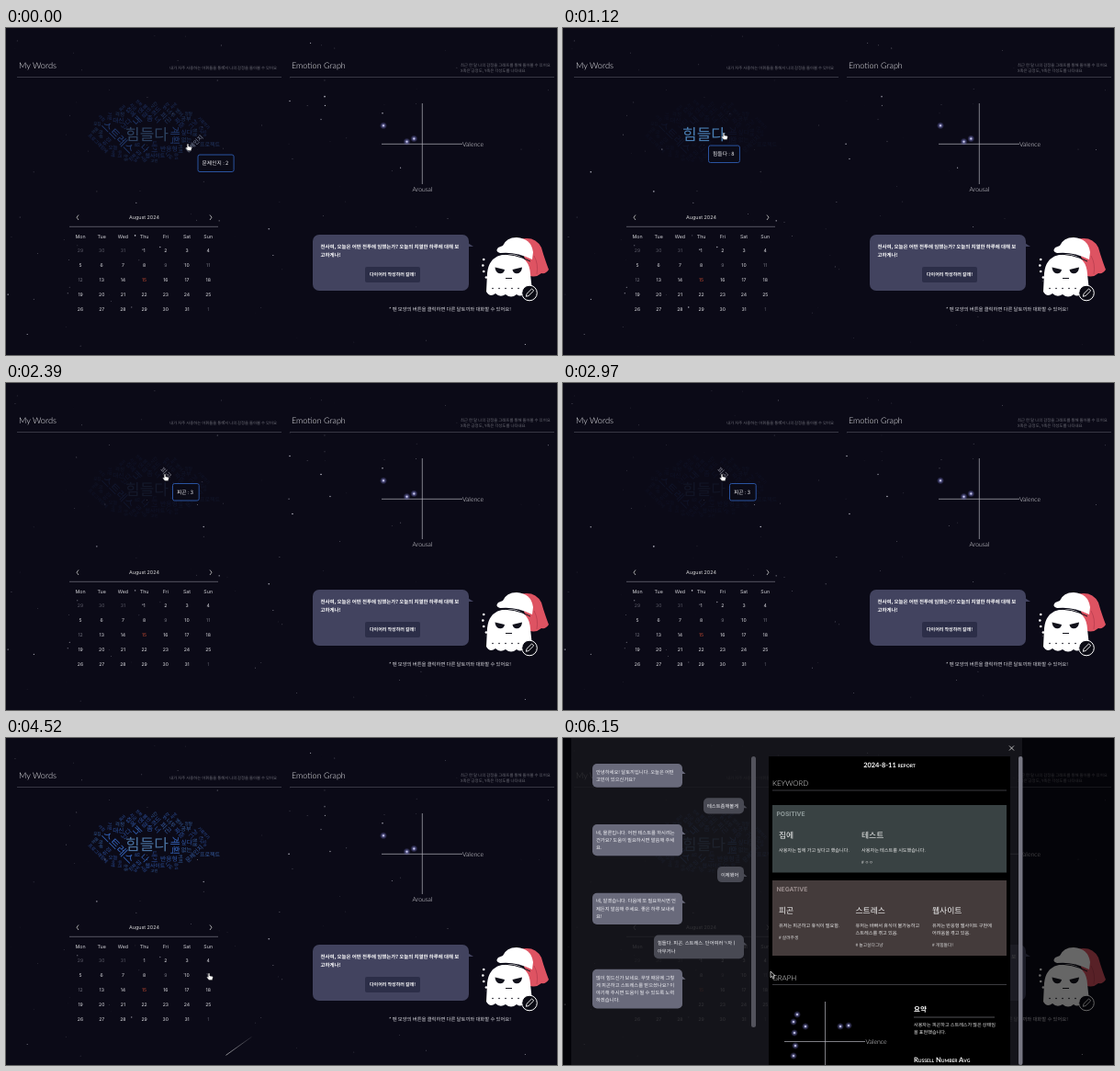
An HTML page for the animation above (6.18 s loop, 600x356 px).

```html
<!DOCTYPE html>
<html>
<head>
<meta charset="utf-8">
<title>Emotion diary</title>
<style>
  html, body { margin: 0; width: 100%; height: 100%; overflow: hidden; background: #0b0a17; }
  svg { display: block; width: 100%; height: 100%; }
  text { font-family: Inter, "Noto Sans CJK KR", "Noto Sans CJK", sans-serif; white-space: pre; text-rendering: geometricPrecision; }
  .ko { font-family: "Noto Sans CJK KR", "Noto Sans CJK", sans-serif; }
  .thin { font-family: Lato, sans-serif; font-weight: 300; }
  .caps { font-family: Lato, sans-serif; font-weight: 700; font-variant: small-caps; }
  .medium { font-weight: 500; }
  .bold { font-weight: 700; }
</style>
</head>
<body>
<svg id="stage" viewBox="0 0 600 356"></svg>
<script>
const LOOP = 6180;
const OPEN_MODAL = 5620;
const stage = document.getElementById("stage");

const text = (x, y, size, str, fill = "#fff", cls = "ko", anchor = "start") =>
  `<text x="${x}" y="${y}" font-size="${size}" fill="${fill}" class="${cls}" text-anchor="${anchor}">${str}</text>`;
const lines = (x, y, size, rows, fill, cls, pitch = 8) =>
  rows.map((row, i) => text(x, y + i * pitch, size, row, fill, cls)).join("");
const rect = (x, y, w, h, fill, r = 0, opacity = 1) =>
  `<rect x="${x}" y="${y}" width="${w}" height="${h}" rx="${r}" fill="${fill}" opacity="${opacity}"/>`;
const path = (d, stroke = "#fff", width = 0.7) =>
  `<path d="${d}" stroke="${stroke}" stroke-width="${width}" fill="none"/>`;
const glow = ([x, y]) =>
  `<circle cx="${x}" cy="${y}" r="4" fill="url(#glow)"/><circle cx="${x}" cy="${y}" r="1" fill="#d0d0ee"/>`;

let seed = 29;
const random = () => (seed = (seed * 16807) % 2147483647) / 2147483647;
const pick = list => list[Math.floor(random() * list.length)];

const stars = Array.from({ length: 110 }, () => ({
  x: 2 + random() * 590,
  y: 5 + random() * 350,
  r: 0.3 + 0.55 * random() ** 3,
  phase: random() * Math.PI * 2,
  cycles: 1 + Math.floor(random() * 3)
}));
const sky = stars.map(s =>
  `<circle class="star" cx="${s.x}" cy="${s.y}" r="${s.r}" fill="#e6e6f2"/>`).join("");

// Word cloud: main words are placed, the rest spiral outwards to the first free spot
const cloud = [
  { word: "힘들다", x: 153.5, y: 116, size: 17, angle: 0, fill: "#4a72a0" },
  { word: "스트레스", x: 122, y: 119, size: 12, angle: 45, fill: "#3361b5" },
  { word: "계획", x: 184, y: 117, size: 11, angle: 90, fill: "#3361b5" },
  { word: "내", x: 143, y: 101, size: 10, angle: -45, fill: "#3361b5" },
  { word: "나", x: 151, y: 131, size: 9, angle: 45, fill: "#3361b5" },
  { word: "피곤", x: 174, y: 98, size: 7.5, angle: 45, fill: "#34599c" },
  { word: "문제인지", x: 205, y: 126, size: 6.5, angle: -45, fill: "#34599c" },
  { word: "프로젝트", x: 222, y: 127, size: 6, angle: 0, fill: "#34599c" }
];
const smallWords = ("좀 난다 너 내가 짜증 반응형 싶다 연결 대신 코드 집에 없는 그냥 너무 공부 집 웹사이트 취업 일 " +
  "걱정 오늘 불안 커피 영어 하루 잠을 기분 프로그래밍에 나도 진짜 우리 생각 지금 정말 시간 친구 모집 기록하기 " +
  "사람 마음 아침 운동 회사 저녁 여행 날씨 음식 전화 약속 고민").split(" ");

const discs = w => [...w.word].map((_, i) => {
  const along = (i - (w.word.length - 1) / 2) * w.size * 0.92;
  const turn = w.angle * Math.PI / 180;
  return { x: w.x + along * Math.cos(turn), y: w.y + along * Math.sin(turn), r: w.size * 0.52 };
});
const occupied = cloud.flatMap(discs);
const isFree = list => list.every(a => occupied.every(b => Math.hypot(a.x - b.x, a.y - b.y) > a.r + b.r));

smallWords.forEach((word, i) => {
  const entry = {
    word,
    size: 4.1 + 3.2 * (1 - i / smallWords.length) ** 1.6,
    angle: pick([-45, 0, 45, 90]),
    fill: pick(["#2e56a4", "#294a92", "#355f9f"])
  };
  const offset = random() * 6;
  for (let reach = 14; reach < 40; reach += 0.03) {
    const turn = reach * 9 + offset;
    entry.x = 156 + reach * 1.95 * Math.cos(turn);
    entry.y = 113 + reach * Math.sin(turn);
    if (isFree(discs(entry))) {
      occupied.push(...discs(entry));
      cloud.push(entry);
      break;
    }
  }
});
const cloudMarkup = cloud.map(w =>
  `<text class="ko word" font-size="${w.size}" text-anchor="middle" transform="translate(${w.x} ${w.y}) rotate(${w.angle})" y="${w.size * 0.36}">${w.word}</text>`).join("");

function dayColor(index) {
  if (index === 17) return "#c24a32";
  if (index < 3 || index === 34) return "#5c5c68";
  return [11, 13, 14].includes(index) ? "#777782" : "#e4e4e8";
}
function calendar() {
  const column = i => 81 + i * 23.2;
  let out = text(150.5, 207.8, 5.4, "August 2024", "#ddd", "", "middle");
  out += path("M79 203.5L77 206.2L79 209M222 203.5L224 206.2L222 209", "#ccc", 0.8);
  out += path("M69 216.3H231", "#777785");
  ["Mon", "Tue", "Wed", "Thu", "Fri", "Sat", "Sun"].forEach((day, i) => {
    out += text(column(i), 228.9, 5.3, day, "#d5d5da", "", "middle");
  });
  for (let i = 0; i < 35; i++) {
    const day = (i + 28) % 31 + 1;
    out += text(column(i % 7), 244 + Math.floor(i / 7) * 16.1, 5.1, day, dayColor(i), "", "middle");
  }
  return out;
}

const mascot = `
  <path d="M560 230Q576 226 583 239Q586 250 591 263Q588 268 583 267Q576 273 569 269L564 248Z" fill="#de5362"/>
  <path d="M575 248Q580 257 578 268" fill="none" stroke="#b23c4c" stroke-width=".7"/>
  <path d="M523 287L524 267Q526 246 548 246Q570 247 571 268L573 286Q570 292 565 288Q561 294 556 290Q550 295 544 290Q538 294 533 289Q527 294 523 287Z" fill="#fff"/>
  <path d="M536 246.5Q554 245 571 254" fill="none" stroke="#11111b" stroke-width="1"/>
  <path d="M541 237Q545 228 556 228Q572 229 574 244L573 252Q555 243 538 245Q532 243 536 239Z" fill="#fff"/>
  <path d="M532.5 260.5L543 263Q542 267.5 538 267.3Q533 267 532.5 260.5ZM562 260.5L551.5 263Q552.5 267.5 556.5 267.3Q561.5 267 562 260.5Z" fill="#11111b"/>
  <path d="M544 272.5H551" stroke="#11111b" stroke-width="1"/>
  ${Array.from({ length: 5 }, (_, i) =>
    `<circle cx="${519.3 + (i - 3) ** 2 * 0.9}" cy="${272 - i * 6.5 + 6}" r="1.3" fill="#fff"/>
     <circle cx="${530 + i * 7}" cy="283.5" r=".8" fill="#11111b"/>`).join("")}
  <circle cx="570" cy="288.5" r="8.3" fill="#0b0b14" stroke="#fff" stroke-width="1"/>
  <path d="M566.3 292.3L567 289.4L572.6 283.9L574.7 286L569.1 291.5Z" fill="none" stroke="#fff" stroke-width=".9"/>`;

const dashboard =
  text(14, 43.5, 9.2, "My Words", "#f0f0f4", "thin") +
  text(311, 43.5, 9, "Emotion Graph", "#f0f0f4", "thin") +
  text(295, 45, 4.35, "내가 자주 사용하는 어휘들을 통해서 나의 감정을 돌아볼 수 있어요", "#6c6c76", "ko", "end") +
  lines(495, 41.6, 4.4, ["최근 한 달 나의 감정을 그래프를 통해 돌아볼 수 있어요", "X축은 긍정도, Y축은 각성도를 나타내요"], "#6c6c76", "ko", 6.3) +
  path("M12 53.5H300M309 53.5H597", "#4b4b58") +
  calendar() +
  path("M453.3 82V170M409 126.3H497", "#b5b5bd") +
  text(497, 129, 6.9, "Valence", "#f0f0f4", "thin") +
  text(453.5, 177.5, 6.8, "Arousal", "#f0f0f4", "thin", "middle") +
  [[411, 106.3], [436.5, 123.7], [444.3, 120.5]].map(glow).join("") +
  rect(334, 225, 170, 61, "#42435f", 7) +
  `<path d="M500 232L509 238H503Z" fill="#42435f"/>` +
  lines(342.5, 240.3, 5.45, ["전사여, 오늘은 어떤 전투에 임했는가? 오늘의 치열한 하루에 대해 보", "고하게나!"], "#fff", "ko bold", 8.2) +
  rect(391, 260, 60, 17, "#2c2e48", 2) +
  text(421, 270.2, 5, "다이어리 작성하러 갈래!", "#fff", "ko bold", "middle") +
  mascot +
  text(417, 307.6, 5.35, "* 펜 모양의 버튼을 클릭하면 다른 달토끼와 대화할 수 있어요!", "#dcdce2");

// Report modal
const messages = [
  { rows: ["안녕하세요! 달토끼입니다. 오늘은 어떤", "고민이 있으신가요?"] },
  { rows: ["테스트좀해볼게"], mine: true },
  { rows: ["네, 물론입니다. 어떤 테스트를 하시려는", "건가요? 도움이 필요하시면 말씀해 주세", "요."] },
  { rows: ["이제됐어"], mine: true },
  { rows: ["네, 알겠습니다. 다음에 또 필요하시면 언", "제든지 말씀해 주세요. 좋은 하루 보내세", "요!"] },
  { rows: ["힘들다. 피곤. 스트레스. 단어여러ㄱ자ㅣ", "아무거나"], mine: true },
  { rows: ["많이 힘드신가 보네요. 무엇 때문에 그렇", "게 피곤하고 스트레스를 받으셨나요? 이", "야기해 주시면 도움이 될 수 있도록 노력", "하겠습니다."] }
];
function chat() {
  let y = 28;
  return messages.map(({ rows, mine }) => {
    const width = Math.min(98, 9 + rows[0].length * 5);
    const height = 8.7 + rows.length * 8.5;
    const right = mine ? 197 : 130;
    const fill = mine ? "#484953" : "#696a7b";
    const bubble = rect(right - width, y, width, height, fill, 5) +
      `<path d="M${right - 2} ${y + 6}l5.5 5h-5.5Z" fill="${fill}"/>` +
      lines(right - width + 4, y + 10.7, 5.3, rows, "#f4f4f8", "ko", 8.3);
    y += height + 11.6;
    return bubble;
  }).join("");
}

function keywordBox(y, height, title, fill, color, pitch, keywords) {
  return rect(228, y, 255, height, fill) +
    text(232.5, y + 12.3, 6.7, title, color, "bold") +
    keywords.map(({ word, rows, tag }, i) => {
      const x = 235 + i * pitch;
      return text(x, y + 35.8, 8.8, word, "#f4f4f4", "ko medium") +
        lines(x, y + 51.3, 5.15, rows, "#ececec", "ko") +
        (tag ? text(x, y + 56 + rows.length * 8, 4.8, tag, "#d8d8d8") : "");
    }).join("");
}

const modal =
  rect(0, 0, 600, 356, "#000", 0, 0.6) +
  rect(9, 0, 491, 356, "#1d1d23", 0, 0.66) +
  path("M486 8.5L491 13.5M491 8.5L486 13.5", "#ddd", 0.8) +
  rect(205, 20, 5, 295, "#53535c", 2.5) +
  rect(496, 20, 4.5, 336, "#777783", 2) +
  chat() +
  rect(224, 20, 263, 336, "#000") +
  text(355.5, 32.3, 7.4, "2024-8-11 report", "#fff", "caps", "middle") +
  text(228, 52, 7.9, "KEYWORD", "#f0f0f0", "thin") +
  path("M228 57H483M228 268.5H483", "#55555c") +
  keywordBox(73, 73.5, "POSITIVE", "#394243", "#8e9999", 90, [
    { word: "집에", rows: ["사용자는 집에 가고 싶다고 했습니다."] },
    { word: "테스트", rows: ["사용자는 테스트를 시도했습니다."], tag: "# ㅇㅇ" }
  ]) +
  keywordBox(155, 82, "NEGATIVE", "#443b3b", "#9b8e8e", 83.5, [
    { word: "피곤", rows: ["유저는 피곤하고 휴식이 필요함."], tag: "# 살려주셍" },
    { word: "스트레스", rows: ["유저는 바빠서 휴식이 불가능하고", "스트레스를 겪고 있음."], tag: "# 놀고싶다그냥" },
    { word: "웹사이트", rows: ["유저는 반응형 웹사이트 구현에", "어려움을 겪고 있음."], tag: "# 개힘들다!" }
  ]) +
  text(228, 263.7, 7.9, "GRAPH", "#f0f0f0", "thin") +
  path("M285.5 287V356M241 330.5H329", "#b5b5bd") +
  text(329.5, 333, 6.9, "Valence", "#f0f0f4", "thin") +
  [[255, 301], [251, 309], [264, 314], [302, 314], [311, 313], [252, 321], [253, 335], [251, 346]].map(glow).join("") +
  text(382, 297.5, 7.5, "요약", "#fff", "ko bold") +
  path("M382 304H470", "#77777c") +
  lines(382, 314.2, 5.1, ["사용자는 피곤하고 스트레스가 많은 상태임", "을 표현했습니다."], "#ececec", "ko") +
  text(382, 353, 7.5, "Russell Number Avg", "#fff", "caps");

stage.innerHTML = `
  <defs>
    <radialGradient id="glow"><stop offset="0" stop-color="#b4b4ff" stop-opacity=".8"/><stop offset="1" stop-color="#7070d0" stop-opacity="0"/></radialGradient>
    <linearGradient id="trail" x1="0" y1="1" x2="1" y2="0"><stop offset="0" stop-color="#fff" stop-opacity=".7"/><stop offset="1" stop-color="#fff" stop-opacity=".1"/></linearGradient>
  </defs>
  ${rect(0, 0, 600, 356, "#0b0a17")}
  ${sky}
  <path id="meteor" d="M0 0L28-20" stroke="url(#trail)" stroke-width=".8"/>
  ${dashboard}
  ${cloudMarkup}
  <g id="tooltip"><rect id="tipBox" height="18.5" rx="2" fill="#0b0b17" stroke="#2e5cb0" stroke-width=".9"/>
    <text id="tipText" class="ko" x="4.5" y="11.4" font-size="5.8" fill="#f0f0f4"></text></g>
  <g id="modal">${modal}</g>
  <g id="cursor">
    <path id="arrow" transform="scale(.85)" d="M0 0V8L2 6.3L3.5 9.4L5 8.7L3.6 5.7H6Z" fill="#111" stroke="#fff" stroke-width=".8"/>
    <path id="hand" transform="scale(.8)" d="M-1 .6Q0-.6 1 .6V3.6L4.6 4.4Q5.7 4.8 5.4 6L4.4 9.4H0L-2.9 6Q-3.1 4.6-1.9 4.9L-1 5.6Z" fill="#fff" stroke="#222" stroke-width=".5"/>
  </g>`;

const byId = id => document.getElementById(id);
const starNodes = [...document.querySelectorAll(".star")];
const wordNodes = [...document.querySelectorAll(".word")];
const show = (node, on) => node.setAttribute("visibility", on ? "visible" : "hidden");
const move = (node, [x, y]) => node.setAttribute("transform", `translate(${x} ${y})`);

const ease = (t, from, to) => {
  const p = Math.min(1, Math.max(0, (t - from) / (to - from)));
  return p * p * (3 - 2 * p);
};
const glide = (t, first, steps) => steps.reduce(
  (pos, { from, to, at }) => pos.map((v, i) => v + (at[i] - v) * ease(t, from, to)), first);

const cursorSteps = [
  { from: 350, to: 800, at: [175, 114] },
  { from: 1500, to: 1850, at: [172, 104] },
  { from: 1900, to: 2300, at: [173, 99] },
  { from: 3250, to: 4200, at: [221, 256] },
  { from: 4900, to: 5300, at: [219, 256] },
  { from: 5700, to: 6120, at: [226, 254] }
];
const tipSteps = [
  { from: 450, to: 950, at: [158.5, 128] },
  { from: 1500, to: 1900, at: [186, 115] },
  { from: 1900, to: 2300, at: [181.5, 109.5] }
];
const hovers = [
  { from: -150, to: 600, word: "문제인지", count: 2, fill: "#8792aa" },
  { from: 600, to: 1740, word: "힘들다", count: 8, fill: "#4a7fb4" },
  { from: 2130, to: 3300, word: "피곤", count: 3, fill: "#858692" }
];
const isPointing = t => t < 1500 || (t > 2050 && t < 3300) || (t > 4150 && t < 5000);

function draw(t) {
  starNodes.forEach((node, i) => {
    const { cycles, phase } = stars[i];
    node.setAttribute("opacity", 0.45 + 0.4 * Math.sin(2 * Math.PI * cycles * t / LOOP + phase));
  });

  const flight = (t - 4400) / 240;
  show(byId("meteor"), flight > 0 && flight < 1);
  move(byId("meteor"), [300 - 120 * flight, 302 + 86 * flight]);

  const hover = hovers.find(h => t >= h.from && t < h.to);
  const blur = ease(t, -150, 150) - ease(t, 1740, 1960) + ease(t, 2130, 2430) - ease(t, 3300, 3600);
  wordNodes.forEach((node, i) => {
    const focused = hover && hover.word === cloud[i].word;
    node.setAttribute("fill", focused ? hover.fill : cloud[i].fill);
    node.setAttribute("opacity", focused ? 1 : 1 - 0.9 * blur);
  });

  const tip = hovers.find(h => t < h.to && t >= h.from) || hovers[2];
  byId("tipBox").setAttribute("width", 18.3 + tip.word.length * 5.2);
  byId("tipText").textContent = `${tip.word} : ${tip.count}`;
  byId("tooltip").setAttribute("opacity", 1 - 0.5 * ease(t, 1740, 2000) + 0.5 * ease(t, 2000, 2250) - ease(t, 3300, 3600));
  move(byId("tooltip"), glide(t, [209, 138], tipSteps));

  show(byId("hand"), isPointing(t));
  show(byId("arrow"), !isPointing(t));
  move(byId("cursor"), glide(t, [198, 126], cursorSteps));
  show(byId("modal"), t >= OPEN_MODAL);
}

const start = performance.now();
function frame() {
  draw((performance.now() - start) % LOOP);
  requestAnimationFrame(frame);
}
frame();
</script>
</body>
</html>
```
